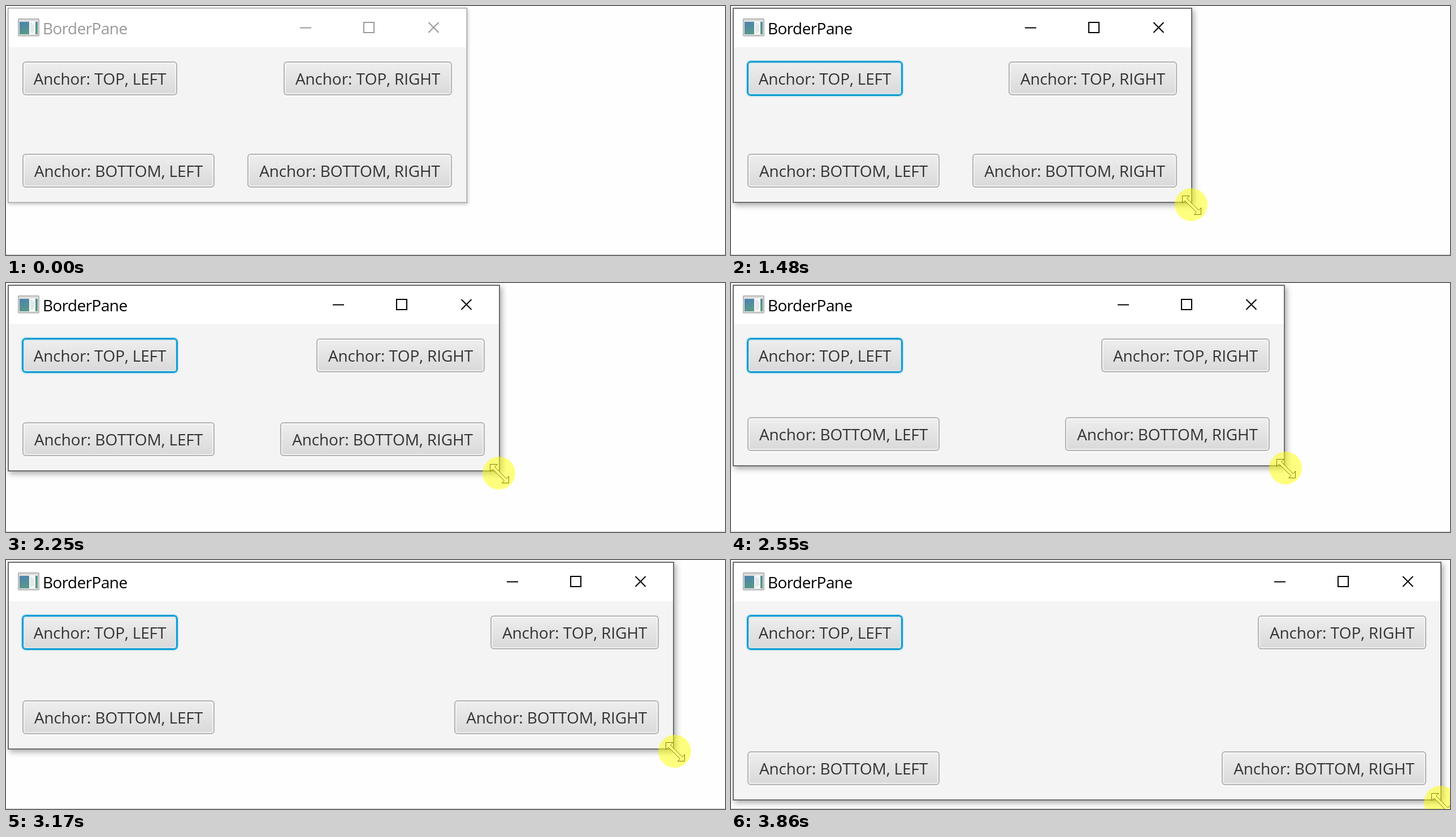
Write an HTML page that moves like this. It is 1272 px wide and 440 px high and loops after 4.24 s.

```html
<!DOCTYPE html>
<html lang="en">
<head>
<meta charset="utf-8">
<title>Anchored buttons</title>
<style>
  html, body { margin: 0; width: 100%; height: 100%; overflow: hidden; background: #fefefe; }
  #stage { position: relative; width: 1272px; height: 440px; overflow: hidden; font: 28px "Open Sans", "Noto Sans", sans-serif; }
  #stage * { position: absolute; box-sizing: border-box; }
  #rule { left: 0; bottom: 0; width: 100%; height: 1px; background: #c6c6c6; }
  #win {
    left: 3px; top: 3px; color: #999;
    background: linear-gradient(#fff 70px, #f4f4f4 0);
    box-shadow: inset 0 0 0 1.5px #a6a6a6, 1px 2px 6px rgba(0, 0, 0, .25);
  }
  #win.active { color: #000; box-shadow: inset 0 0 0 2px #6c6d6f, 3px 4px 10px rgba(0, 0, 0, .34); }
  #title { left: 62px; top: 1px; line-height: 70px; letter-spacing: -.6px; white-space: nowrap; }
  #icon { left: 18px; top: 18px; }
  #controls { right: 0; top: 0; fill: none; stroke: currentColor; stroke-width: 2; }
  .btn {
    height: 60px; display: flex; align-items: center; justify-content: center;
    color: #333; letter-spacing: -.13px; font-kerning: none; white-space: nowrap;
    border: 2px solid #b4b4b4; border-radius: 6px;
    background: linear-gradient(#eee, #d9d9d9);
    box-shadow: inset 0 0 0 2px rgba(255, 255, 255, .55), 0 2px 0 #fcfcfc;
  }
  .top { top: 95px; }
  .bottom { bottom: 27px; }
  .left { left: 26px; }
  .right { right: 27px; }
  .active .top.left {
    border-color: #0a9bd3;
    box-shadow: inset 0 0 0 2px #d3e4ea, 0 0 0 1px #0a9bd3, 0 0 0 3px #d2eaf2;
  }
  #cursor { left: 0; top: 0; overflow: visible; fill: #fff; stroke: #000; }
  #halo { left: 0; top: 0; width: 58px; height: 58px; border-radius: 50%; background: rgba(255, 255, 0, .5); }
</style>
</head>
<body>
<div id="stage">
  <div id="rule"></div>
  <div id="win">
    <svg id="icon" width="38" height="33">
      <defs>
        <linearGradient id="view" x2=".6" y2="1">
          <stop stop-color="#4a82b4"/><stop offset="1" stop-color="#5b9c80"/>
        </linearGradient>
      </defs>
      <rect x=".75" y="1.75" width="36.5" height="30" rx="1" fill="#dedede" stroke="#aaa" stroke-width="1.5"/>
      <rect x="3" y="7" width="32" height="22" fill="url(#view)"/>
      <rect x="20" y="6" width="11" height="23" fill="#fafafa"/>
      <path d="M22 10h4M22 13h7M22 16h7M22 19h7M22 22h7M22 25h5" stroke="#b9c3cc"/>
    </svg>
    <div id="title">BorderPane</div>
    <svg id="controls" width="300" height="70">
      <path d="M4 35.5h20M117 26h18v18h-18zM231.500 26l18 18M249.500 26l-18 18"/>
    </svg>
    <div class="btn top left" style="width:274px">Anchor: TOP, LEFT</div>
    <div class="btn top right" style="width:298px">Anchor: TOP, RIGHT</div>
    <div class="btn bottom left" style="width:340px">Anchor: BOTTOM, LEFT</div>
    <div class="btn bottom right" style="width:362px">Anchor: BOTTOM, RIGHT</div>
  </div>
  <svg id="cursor" width="1" height="1">
    <path id="arrow" d="M.5.5v26.500l6-5.500 4.500 10.500 4-1.700-4.500-10.300h8.500z"/>
    <path id="resize" transform="translate(-17 -17)"
      d="M.5.5H13L8.500 5l21 21L33.500 21.500V33.500H21.500L25.500 29.500 5 9 .5 13z"/>
  </svg>
  <div id="halo"></div>
</div>
<script>
const LOOP = 4240, SHOW = 220, PRESS = 1480, DRAG = 2000, STEP = 77.5;

// Window corner along the drag, one point every four steps.
const path = [[816, 348], [874, 333], [980, 324], [1099, 322], [1182, 335], [1246, 386], [1257, 425]];

const el = id => document.getElementById(id);
const win = el('win'), cursor = el('cursor'), arrow = el('arrow'), resize = el('resize'), halo = el('halo');
const show = (node, on) => { node.style.display = on ? '' : 'none'; };
const move = (node, x, y) => { node.style.transform = `translate(${x}px, ${y}px)`; };
const clamp = (v, max) => Math.min(Math.max(v, 0), max);

const steps = (t, start) => Math.floor((t - start) / STEP);

// Point on the path; u counts path segments.
function corner(u) {
  const i = Math.min(Math.floor(u), path.length - 2);
  return path[i].map((v, n) => Math.round(v + (path[i + 1][n] - v) * (u - i)));
}

// The pointer slows down as it nears the window corner.
function approach(t) {
  const p = clamp(steps(t, SHOW) / 13, 1);
  return [815 + 192 * (1 - p) ** 2.4, 352 + 58 * (1 - clamp(p * 2.15, 1) ** 2)];
}

// The cursor holds the corner and pulls ahead of it mid-drag.
function grip([right, bottom], p) {
  return [right - 1 + 16 * Math.sin(Math.PI * p) ** 12, bottom + 4];
}

function draw(t) {
  const last = path.length - 1;
  const u = clamp((steps(t, DRAG) + 1) / 4, last);
  const edge = corner(u), pressed = t >= PRESS;
  const [x, y] = (pressed ? grip(edge, u / last) : approach(t)).map(Math.round);
  const sizing = pressed || x < 826;
  win.style.width = edge[0] - 3 + 'px';
  win.style.height = edge[1] - 3 + 'px';
  win.classList.toggle('active', pressed);
  show(cursor, t >= SHOW);
  show(arrow, !sizing);
  show(resize, sizing);
  show(halo, pressed);
  move(cursor, x, y);
  move(halo, x - 30, y - 30);
}

const begin = performance.now();
function frame() {
  draw((performance.now() - begin) % LOOP);
  requestAnimationFrame(frame);
}
frame();
</script>
</body>
</html>
```
